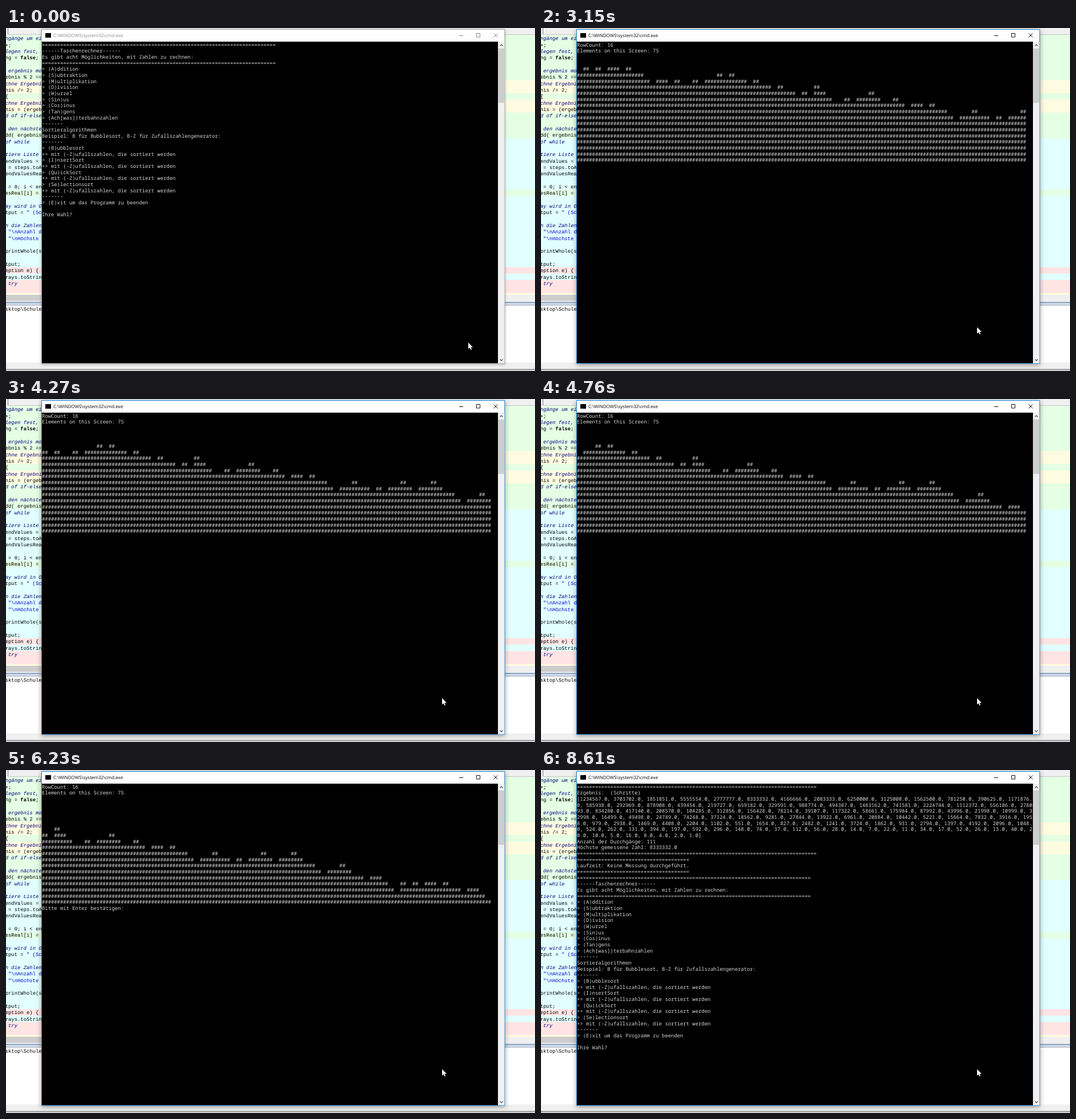
Recreate the animation shown at these times as an HTML page. Size 928 by 603 pixels, loop 8.89 s.

```html
<!DOCTYPE html>
<html lang="de">
<head>
<meta charset="utf-8">
<title>Taschenrechner</title>
<style>
  html, body { margin: 0; width: 100%; height: 100%; overflow: hidden; background: #f0f0f0; }
  svg { display: block; text-rendering: geometricPrecision; }
  text { white-space: pre; }
  #editor { font: 8.889px "Liberation Mono", monospace; }
  #console { font: 8.889px "Noto Sans Mono", monospace; fill: #d6d6d6; }
  #title { font: 8px "Open Sans", sans-serif; }
  .comment { fill: #00007f; font-style: italic; }
  .string { fill: #0000d0; }
  .bold { font-weight: bold; }
  #frame { fill: #fff; stroke: #1883d7; filter: drop-shadow(0 2px 4.5px rgba(0,0,0,.38)); }
  #buttons { fill: none; stroke: #111; }
  .inactive #frame { stroke: #a4a4a4; filter: drop-shadow(0 1px 2.5px rgba(0,0,0,.3)); }
  .inactive #title { fill: #888; }
  .inactive #buttons { stroke: #888; }
</style>
</head>
<body>
<svg id="stage" width="928" height="603" viewBox="0 0 928 603">
  <g id="editor"></g>
  <g id="window">
    <rect id="frame" x="62.5" y="2.5" width="812.3" height="587.3"/>
    <rect x="69" y="9" width="10" height="8"/>
    <text id="title" x="83" y="16">C:\WINDOWS\system32\cmd.exe</text>
    <g id="buttons">
      <path d="M795 13.5h7M825.5 9.5h6v6.5h-6z"/>
      <path d="M855.5 9.5l7 7m0-7l-7 7"/>
    </g>
    <rect x="63" y="24" width="800" height="565.3"/>
    <rect x="863" y="24" width="11.3" height="565.3" fill="#f0f0f0"/>
    <rect x="863.5" y="36" width="10.8" height="95.5" fill="#cdcdcd"/>
    <path d="M866.5 31.5l2.5-2.5 2.5 2.5M866.5 582.5l2.5 2.5 2.5-2.5" fill="none" stroke="#505050" stroke-width="1.2"/>
  </g>
  <g id="console"></g>
  <rect id="caret" width="5.333" height="2.667" fill="#c4c4c4"/>
  <path id="mouse" d="M0 0V11.3L2.6 8.9 4.3 12.8 6 12 4.3 8.2H8Z" fill="#fff"/>
</svg>
<script>
const LOOP = 8890, TICK = 70;
const CELL = 16 / 3, ROW = 32 / 3, LEFT = 63, TOP = 24;
const COLUMNS = 150, ELEMENTS = 75, CHART_ROWS = 16;
const $ = id => document.getElementById(id);

function add(parent, tag, attrs, content = '') {
  const node = document.createElementNS('http://www.w3.org/2000/svg', tag);
  for (const name in attrs) node.setAttribute(name, attrs[name]);
  node.textContent = content.replace(/ /g, '\u00a0');
  return parent.appendChild(node);
}

// Editor behind the console
function buildEditor() {
  const editor = $('editor'), pitch = 34 / 3, top = 12.4;
  const box = (x, y, width, height, fill) => add(editor, 'rect', { x, y, width, height, fill });
  const green = '#e4ffe4', yellow = '#fffbe0', cyan = '#e2ffff', red = '#ffe4e4';
  const bands = [[0, green], [7, yellow], [9, green], [10, yellow], [12, green], [16, cyan],
    [24, green], [25, cyan], [36, red], [37, cyan], [38, red], [40, yellow]];

  box(0, 0, 928, 12, '#f0f0f0');
  box(3, 0, 1, 11, '#808080');
  box(4, 11, 924, 1, '#c8c8c8');
  for (const [row, color] of bands) {
    const y = top + row * pitch;
    box(0, y, 928, 469 - y, color);
  }
  box(0, 469, 928, 12, '#f0f0f0');
  box(0, 469, 62, 10.5, '#cdcdcd');
  box(0, 481, 928, 7, '#e4ebf4');
  box(0, 481.5, 928, 2.5, '#93a9c6');
  box(0, 486.5, 928, 1, '#8594aa');
  box(0, 488, 928, 100, '#fff');
  box(0, 588, 928, 15, '#f0f0f0');
  box(0, 599.5, 928, 1.5, '#8c8c8c');
  box(0, 601, 928, 2, '#d4d4d4');

  // A leading / marks a comment
  const code = `/ngänge um ei
+;
/legen fest,
ng = *false*;

/ ergebnis mo
ebnis % 2 ==
/chne Ergebni
nis /= 2;
{
/chne Ergebni
nis = (ergeb
/d of if-else

/ den nächste
dd( ergebnis
/of while

/tiere Liste 
endValues = 
 = steps.toA
endValuesRea

 = 0; i < en
esReal[i] = 

/ay wird in O
tput = ~" (Sc

/n die Zahlen
 ~"\\nAnzahl d
 ~"\\nHöchste 

printWhole(s

tput;
eption e) {
rays.toStrin
/ try`;
  code.split('\n').forEach((source, row) => {
    const comment = source[0] === '/';
    const line = add(editor, 'text', { x: -1.3, y: top + row * pitch + 9, class: comment ? 'comment' : '' });
    const parts = comment ? [source.slice(1)] : source.split(/(\*.*\*|~.*)/);
    for (const part of parts) {
      const style = { '*': 'bold', '~': 'string' }[part[0]] || '';
      add(line, 'tspan', { class: style }, style ? part.replace(/[*~]/g, '') : part);
    }
  });
  add(editor, 'text', { x: -1.3, y: 497 }, 'sktop\\Schule');
}

// Console contents
const rule = (count, char = '=') => char.repeat(count);
const randomHint = '+> mit (-Z)ufallszahlen, die sortiert werden';
const menu = [
  rule(77), '------Taschenrechner------', 'Es gibt acht Möglichkeiten, mit Zahlen zu rechnen:', rule(77),
  ...['(A)ddition', '(S)ubtraktion', '(M)ultiplikation', '(D)ivision', '(W)urzel', '(Sin)us', '(Cos)inus',
    '(Tan)gens', '(Ach[was])terbahnzahlen'].map(name => '> ' + name),
  rule(7, '-'), 'Sortieralgorithmen', 'Beispiel: B für Bubblesort, B-Z für Zufallszahlengenerator:', rule(7, '-'),
  ...['(B)ubblesort', '(I)nsertSort', '(Qu)ickSort', '(Se)lectionsort'].flatMap(name => ['> ' + name, randomHint]),
  rule(7, '-'), '> (E)xit um das Programm zu beenden', '', 'Ihre Wahl? '
];

const values = [1234567];
for (let n = values[0]; n > 1; values.push(n)) n = n % 2 ? 3 * n + 1 : n / 2;

const listing = '[' + values.map(n => n + '.0').join(', ') + ']';
const result = [
  rule(79), 'Ergebnis:  (Schritte)',
  ...listing.match(new RegExp(`.{1,${COLUMNS}}`, 'g')),
  'Anzahl der Durchgänge: ' + (values.length - 1),
  `Höchste gemessene Zahl: ${Math.max(...values)}.0`,
  rule(79), rule(37), 'Laufzeit: Keine Messung durchgeführt.', rule(37), ...menu
];

const header = ['RowCount: ' + CHART_ROWS, 'Elements on this Screen: ' + ELEMENTS, '', ''];

// The last column pair of the screen stays empty
function chart(offset) {
  const visible = values.slice(offset, offset + ELEMENTS - 1);
  return Array.from({ length: CHART_ROWS }, (_, i) =>
    visible.map(n => Math.log(n) >= CHART_ROWS - 1 - i ? '##' : '  ').join(''));
}

// Timing
const choiceKeys = [[420, 'a'], [560, 'c'], [630, 'h']];
const valueKeys = [[2380, '1'], [2450, '2'], [2520, '3'], [2660, '45'], [2730, '6'], [2870, '7']];
const scrollRuns = [[3220, 9], [3920, 3], [4200, 2], [4410, 6], [4900, 6], [5390, 10], [6160, 1]];
const blinks = [[1540, 2030, 20, 29], [2520, 2660, 23, 29], [6860, 7350, 0, 21], [7840, 8260, 0, 21]];

const typed = (keys, t) => keys.filter(([at]) => t >= at).map(([, key]) => key).join('');
const scrollAt = t => scrollRuns.reduce((sum, [start, count]) =>
  sum + Math.max(0, Math.min(count, Math.floor((t - start) / TICK) + 1)), 0);

function screenAt(t) {
  if (t < 3010) {
    const lines = [...menu];
    lines[28] += typed(choiceKeys, t);
    if (t >= 980) lines.push('Eingabe des Wertes: ' + typed(valueKeys, t));
    return lines;
  }
  if (t >= 8610) return result;
  if (t < 3080) return [];
  if (t < 3150) return header;
  return [...header, ...chart(scrollAt(t)), t >= 6230 ? 'Bitte mit Enter bestätigen:' : ''];
}

buildEditor();
const rows = result.map((_, i) => add($('console'), 'text', { x: LEFT, y: TOP + i * ROW + 8.5 }));
const shown = rows.map(() => '');

function draw(t) {
  const lines = screenAt(t);
  rows.forEach((row, i) => {
    const line = lines[i] || '';
    if (line !== shown[i]) row.textContent = (shown[i] = line).replace(/ /g, '\u00a0');
  });

  const blink = blinks.find(([on, off]) => t >= on && t < off);
  $('caret').style.display = blink ? '' : 'none';
  if (blink) {
    $('caret').setAttribute('x', LEFT + blink[2] * CELL);
    $('caret').setAttribute('y', TOP + blink[3] * ROW + 8);
  }

  $('window').setAttribute('class', t < TICK ? 'inactive' : '');
  const step = Math.min(2, Math.floor(t / TICK));
  $('mouse').setAttribute('transform', `translate(${811 - 23 * step} ${553 - 13.5 * step})`);
}

const start = performance.now();
function tick() {
  draw((performance.now() - start) % LOOP);
  requestAnimationFrame(tick);
}
tick();
</script>
</body>
</html>
```
